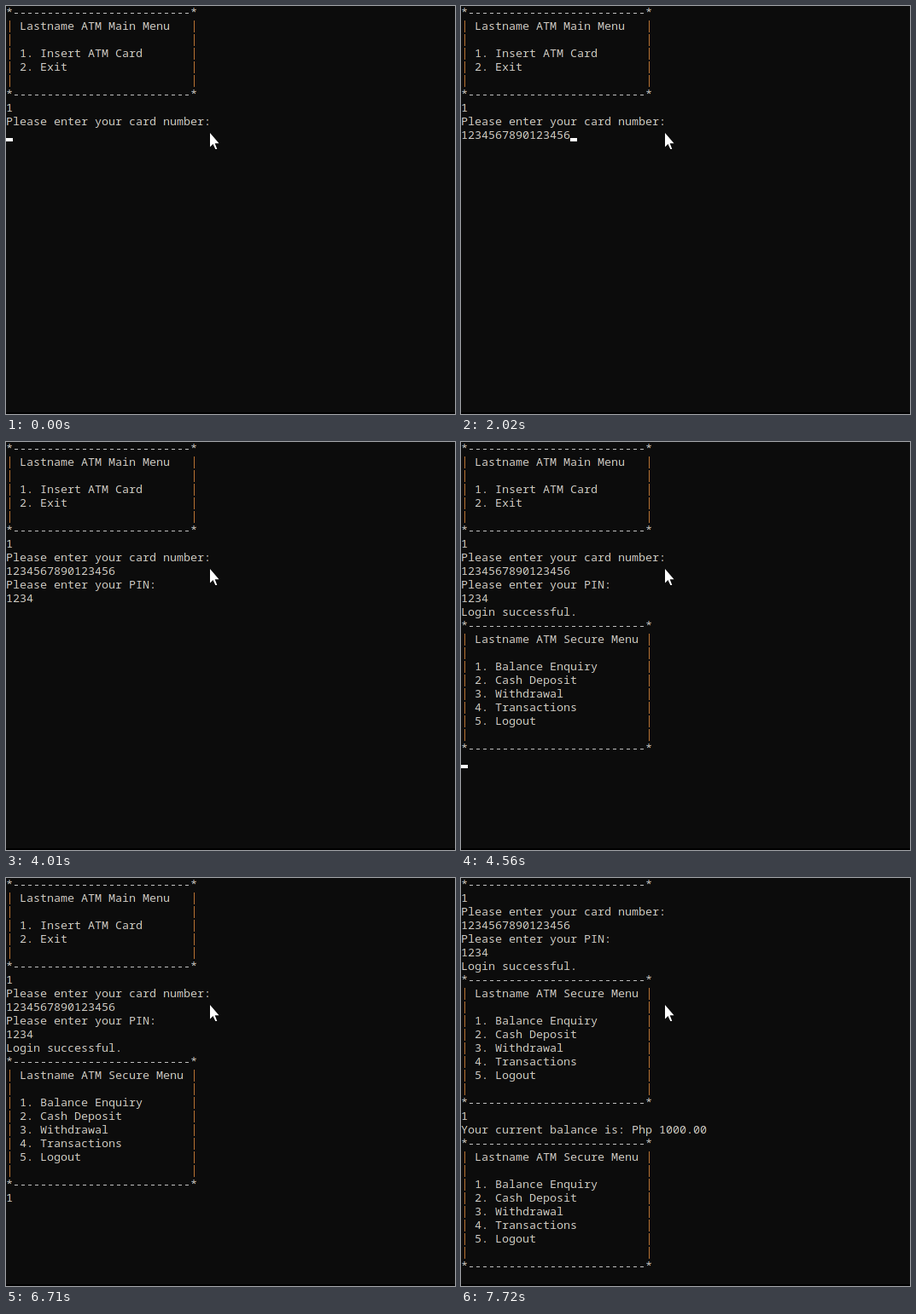
These frames come from a looping animation (526x479 px, 8000 ms). An HTML page with a canvas:

```html
<!DOCTYPE html>
<html lang="en">
<head>
<meta charset="utf-8">
<title>ATM console</title>
<style>
  html, body { margin: 0; width: 100%; height: 100%; overflow: hidden; background: #0c0c0c; }
  canvas { display: block; }
</style>
</head>
<body>
<canvas id="stage" width="526" height="479"></canvas>
<script>
const ctx = document.getElementById('stage').getContext('2d');
const CELL_W = 8, CELL_H = 16, LOOP = 8000;

function menu(title, items) {
  const edge = '*' + '-'.repeat(26) + '*';
  const body = [title, '', ...items.map((item, i) => `${i + 1}. ${item}`), ''];
  return [edge, ...body.map(s => '| ' + s.padEnd(25) + '|'), edge];
}

const mainMenu = menu('Lastname ATM Main Menu', ['Insert ATM Card', 'Exit']);
const secureMenu = menu('Lastname ATM Secure Menu',
  ['Balance Enquiry', 'Cash Deposit', 'Withdrawal', 'Transactions', 'Logout']);

// Console output: [time, text]; the text is appended to what is already there.
const output = [
  [0, mainMenu.join('\n') + '\n1\nPlease enter your card number:\n'],
  [1360, '1234567890123456'],
  [2750, '\nPlease enter your PIN:\n'],
  [3310, '1'], [3460, '2'], [3760, '3'], [4010, '4'],
  [4560, '\nLogin successful.\n' + secureMenu.join('\n') + '\n'],
  [6580, '1'],
  [7140, '\nYour current balance is: Php 1000.00\n' + secureMenu.join('\n') + '\n']
];

// Intervals in which the caret is lit.
const caretOn = [[0, 430], [950, 1490], [2020, 2480], [2750, 3610], [3760, 4010],
  [4560, 5110], [5680, 6210], [6580, 6710], [7140, 7720]];

function rect(color, x, y, w, h) {
  ctx.fillStyle = color;
  ctx.fillRect(x, y, w, h);
}

function drawChar(ch, x, y) {
  if (ch === ' ') return;
  if (ch === '|') return rect('#b87333', x + 4, y + 1, 1, 14);
  if (ch === '-') return rect('#c0c0c0', x + 2, y + 8, 4, 1);
  // Subpixel colour fringes: one pass per channel.
  ctx.globalCompositeOperation = 'lighter';
  [['#c40000', 1 / 3], ['#00c000', 0], ['#0000b8', -1 / 3]].forEach(([color, shift]) => {
    ctx.fillStyle = color;
    ctx.fillText(ch, x + shift, y + 12);
  });
  ctx.globalCompositeOperation = 'source-over';
}

function drawPointer() {
  ctx.fillStyle = '#fff';
  ctx.fill(new Path2D('M239 149V165.5L242.5 162L245.3 168H247.3L244.7 161.3H249.5Z'));
}

function draw(t) {
  rect('#0c0c0c', 0, 0, 526, 479);
  rect('#000', 0, 477, 526, 2);
  ctx.font = '13.333px "Noto Sans Mono", "DejaVu Sans Mono", monospace';

  const lines = output.filter(([at]) => t >= at).map(([, text]) => text).join('').split('\n');
  const visible = lines.slice(-30);
  visible.forEach((line, row) =>
    [...line].forEach((ch, col) => drawChar(ch, col * CELL_W, row * CELL_H)));

  if (caretOn.some(([from, to]) => t >= from && t < to)) {
    const row = visible.length - 1;
    rect('#fff', visible[row].length * CELL_W, row * CELL_H + 11, 8, 4);
  }
  drawPointer();
}

const start = performance.now();
function frame() {
  draw((performance.now() - start) % LOOP);
  requestAnimationFrame(frame);
}
frame();
</script>
</body>
</html>
```
